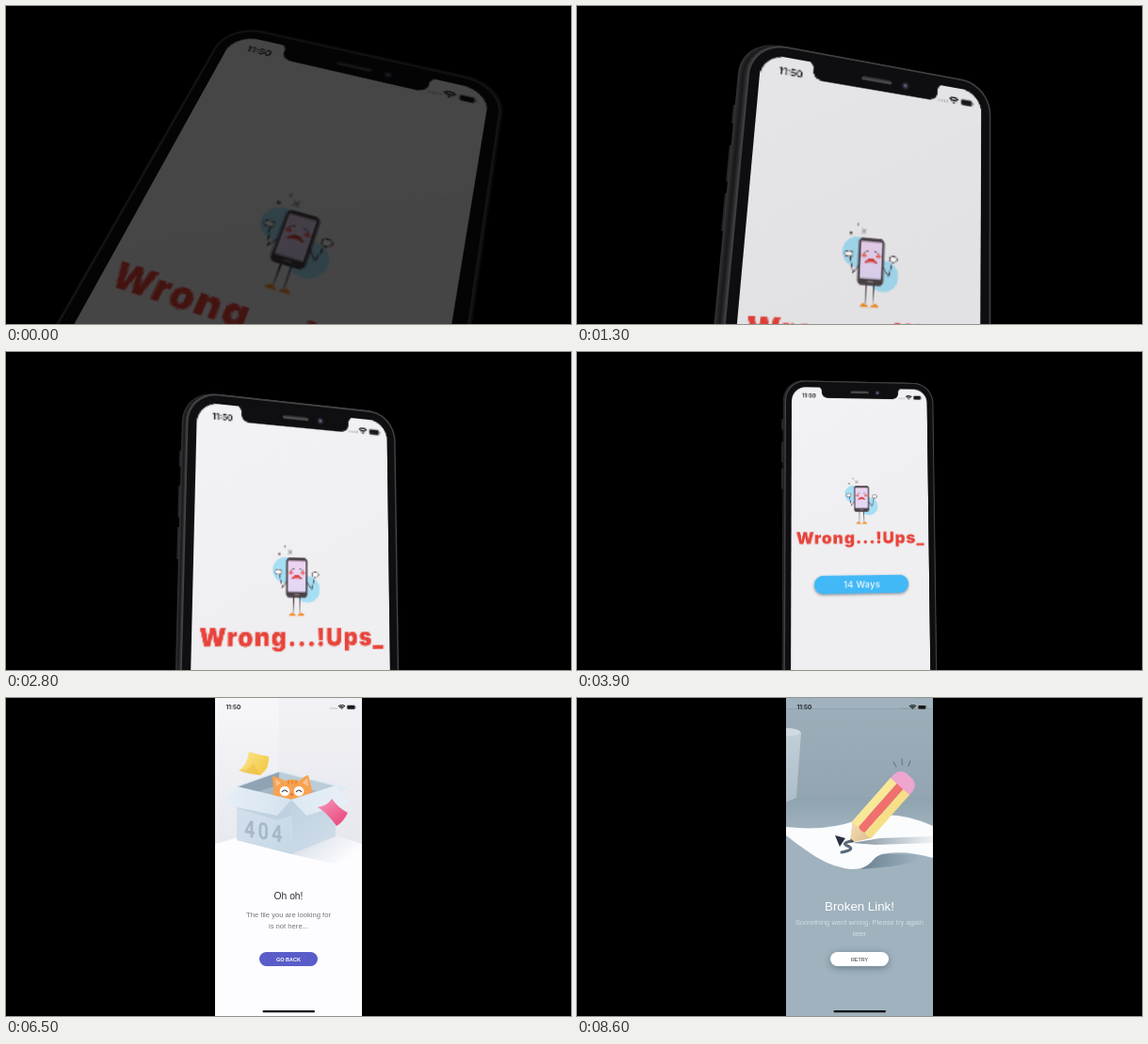
An HTML page with a canvas that plays this animation: 600x338 px, repeating every 8.9 s.

```html
<!DOCTYPE html>
<html lang="en">
<head>
<meta charset="utf-8">
<title>Error pages</title>
<style>
  html, body { margin: 0; width: 100%; height: 100%; overflow: hidden; background: #000; }
  #stage { position: relative; width: 600px; height: 338px; overflow: hidden; }
  canvas { position: absolute; left: 0; top: 0; }
  #screen { width: 156px; height: 338px; transform-origin: 0 0; }
</style>
</head>
<body>
<div id="stage">
  <canvas id="body" width="600" height="338"></canvas>
  <canvas id="screen"></canvas>
</div>
<script>
const LOOP = 8900, W = 156, H = 338, REF = 171;
const SANS = '"Liberation Sans", Arial, sans-serif';
const INTER = 'Inter, Roboto, sans-serif';
const stage = document.getElementById('stage');
const shell = document.getElementById('body');
const screen = document.getElementById('screen');
const bctx = shell.getContext('2d');
const ctx = screen.getContext('2d');

const clamp = v => Math.max(0, Math.min(1, v));
const span = (t, a, b) => clamp((t - a) / (b - a));
const smooth = v => v * v * (3 - 2 * v);
const mix = (a, b, k) => a.map((v, i) => v + (b[i] - v) * k);

// Pose: screen points at (0,0), (W,0), (W,REF), (0,REF), then the offset of the phone's back.
const low   = [243, 30, 514, 91, 464, 397, 104, 281, 2, -1];
const near  = [196, 50, 429.5, 92, 428.5, 353, 169.5, 342, -10, -1];
const mid   = [203, 53, 404.5, 74, 407.5, 303, 197, 304, -5, 0];
const far   = [228, 37, 371.5, 40, 373.5, 197, 227.5, 198, -2, 0];
const front = [236, 31, 364, 31, 364, 171, 236, 171, 0, 0];
const full  = [222, 0, 378, 0, 378, REF, 222, REF, 0, 0];
const keys = [
  [0, low], [950, mix(low, near, 0.58)], [1300, near], [1900, mix(near, mid, 0.35)],
  [2800, mid], [3700, mix(mid, far, 0.78)], [3900, far], [4550, front], [4700, front], [5200, full]
];

// Monotone cubic interpolation, so that poses never overshoot.
function poseAt(t) {
  if (t >= 5200) return full;
  let n = 0;
  while (n < keys.length - 2 && t >= keys[n + 1][0]) n++;
  const [t0, p0] = keys[n], [t1, p1] = keys[n + 1];
  const d = t1 - t0, u = (t - t0) / d;
  const secant = (k, i) => (keys[k + 1][1][i] - keys[k][1][i]) / (keys[k + 1][0] - keys[k][0]);
  const slope = (k, i) => {
    if (k === 0 || k === keys.length - 1) return 0;
    const a = secant(k - 1, i), b = secant(k, i);
    return a * b <= 0 ? 0 : 2 * a * b / (a + b);
  };
  return p0.map((v, i) => {
    const s = smooth(u), w = 1 - u;
    return v + (p1[i] - v) * s + d * (slope(n, i) * u * w * w - slope(n + 1, i) * u * u * w);
  });
}

function homography([x0, y0, x1, y1, x2, y2, x3, y3]) {
  const sx = x0 - x1 + x2 - x3, sy = y0 - y1 + y2 - y3;
  const ax = x1 - x2, ay = y1 - y2, bx = x3 - x2, by = y3 - y2;
  const den = ax * by - bx * ay;
  const g = (sx * by - bx * sy) / den, h = (ax * sy - sx * ay) / den;
  return {
    a: (x1 - x0 + g * x1) / W, b: (x3 - x0 + h * x3) / REF, c: x0,
    d: (y1 - y0 + g * y1) / W, e: (y3 - y0 + h * y3) / REF, f: y0,
    g: g / W, h: h / REF
  };
}
function project(m, x, y) {
  const w = m.g * x + m.h * y + 1;
  return [(m.a * x + m.b * y + m.c) / w, (m.d * x + m.e * y + m.f) / w];
}

// Phone body
function outline(m, grow, r, ox, oy) {
  const corners = [[W + grow - r, r - grow], [W + grow - r, H + grow - r], [r - grow, H + grow - r], [r - grow, r - grow]];
  bctx.beginPath();
  corners.forEach(([cx, cy], q) => {
    for (let i = 0; i <= 10; i++) {
      const a = (q - 1 + i / 10) * Math.PI / 2;
      const [x, y] = project(m, cx + r * Math.cos(a), cy + r * Math.sin(a));
      bctx.lineTo(x + ox, y + oy);
    }
  });
  bctx.closePath();
}
function drawBody(m, ox, oy, alpha) {
  bctx.clearRect(0, 0, 600, 338);
  if (!alpha) return;
  bctx.globalAlpha = alpha;
  bctx.lineWidth = 2.5;
  bctx.strokeStyle = '#29292b';
  for (const [y0, y1] of [[37, 49], [63, 86], [93, 116]]) {
    const p = project(m, -7.8, y0), q = project(m, -7.8, y1);
    bctx.beginPath();
    bctx.moveTo(p[0] + ox, p[1] + oy);
    bctx.lineTo(q[0] + ox, q[1] + oy);
    bctx.stroke();
  }
  for (let i = 6; i >= 0; i--) {
    outline(m, 7.5, 23, ox * i / 6, oy * i / 6);
    bctx.fillStyle = ['#434345', '#333335', '#242426', '#1c1c1e', '#202022', '#2a2a2c', '#343436'][i];
    bctx.fill();
  }
  outline(m, 6.3, 22, 0, 0);
  bctx.fillStyle = '#0f0f11';
  bctx.fill();
  bctx.globalAlpha = 1;
}

// Drawing helpers for the flat screen
function poly(fill, ...pts) {
  ctx.beginPath();
  pts.forEach(p => ctx.lineTo(p[0], p[1]));
  ctx.closePath();
  ctx.fillStyle = fill;
  ctx.fill();
}
function line(color, width, ...pts) {
  ctx.beginPath();
  pts.forEach(p => ctx.lineTo(p[0], p[1]));
  ctx.strokeStyle = color;
  ctx.lineWidth = width;
  ctx.stroke();
}
function oval(fill, x, y, rx, ry = rx) {
  ctx.beginPath();
  ctx.ellipse(x, y, rx, ry, 0, 0, 7);
  ctx.fillStyle = fill;
  ctx.fill();
}
function pill(fill, x, y, w, h, r) {
  ctx.beginPath();
  ctx.roundRect(x, y, w, h, r);
  ctx.fillStyle = fill;
  ctx.fill();
}
function curve(d, fill, stroke, width) {
  const p = new Path2D(d);
  if (fill) { ctx.fillStyle = fill; ctx.fill(p); }
  if (stroke) { ctx.strokeStyle = stroke; ctx.lineWidth = width; ctx.stroke(p); }
}
function fade(x0, y0, x1, y1, ...stops) {
  const g = ctx.createLinearGradient(x0, y0, x1, y1);
  stops.forEach((c, i) => g.addColorStop(i / (stops.length - 1), c));
  return g;
}
function label(text, x, y, font, fill, align = 'center', spacing = '0px') {
  ctx.font = font;
  ctx.textAlign = align;
  ctx.letterSpacing = spacing;
  ctx.fillStyle = fill;
  ctx.fillText(text, x, y);
  ctx.letterSpacing = '0px';
}
function shadowed(color, blur, dy, draw) {
  const scale = screen.width / W;
  ctx.save();
  ctx.shadowColor = color;
  ctx.shadowBlur = blur * scale;
  ctx.shadowOffsetY = dy * scale;
  draw();
  ctx.restore();
}

function drawMascot() {
  ctx.save();
  ctx.translate(79, 127);
  ctx.lineCap = ctx.lineJoin = 'round';
  oval('#a6def5', -9.5, -5.5, 9.5);
  oval('#a6def5', 8.5, 8.5, 10);
  const ink = '#4a4146';
  line(ink, 0.6, [-8, 3], [-11.5, 7.5], [-14, -3]);
  line(ink, 0.6, [8, 3], [12, 8.5], [14.5, -1.5]);
  for (const [x, y] of [[-14.6, -4], [14.8, -2.6]]) {
    oval(ink, x, y, 2.9, 2.2);
    oval('#fff', x, y, 2.3, 1.6);
  }
  for (const s of [-1, 1]) {
    line(ink, 0.6, [s * 2.5, 13], [s * 2.9, 26]);
    curve(`M${s * 3.2 - 3} 28.3 Q${s * 4.2} 24 ${s * 3.2 + 3} 28.3 Z`, '#f58a1f');
  }
  pill(ink, -8.5, -14.7, 17, 29.4, 2.4);
  pill(fade(-7, -12, 7, 9, '#efd3f0', '#e2d9f8'), -7.2, -12.6, 14.4, 23.2, 0.8);
  pill('#857b82', -2, 12, 4, 1.1, 0.5);
  for (const s of [-1, 1]) {
    line(ink, 0.5, [s * 2.4, -6.5], [s * 4.9, -5.6]);
    oval('#f0645f', s * 4.8, -3.6, 1.7, 1.1);
  }
  curve('M-4.2 0.8 Q0 -4.5 4.2 0.8 Q0 -0.6 -4.2 0.8 Z', '#e7413a', '#c5383a', 0.4);
  line(ink, 0.5, [-7, -20.5], [-4, -17.5]);
  line(ink, 0.5, [-4, -20.5], [-7, -17.5]);
  line(ink, 0.4, [-15, -18], [-13, -16.4]);
  line(ink, 0.4, [-13, -18], [-15, -16.4]);
  oval('#6b7780', -9.7, -23, 0.7);
  ctx.restore();
}

function homePage() {
  ctx.fillStyle = fade(0, 0, 90, 160, '#f3f2f5', '#efeef1');
  ctx.fillRect(0, 0, W, H);
  drawMascot();
  label('Wrong...!Ups_', 5.3, 177.3, `900 18.5px ${INTER}`, '#e8433a', 'left', '0.85px');
  shadowed('rgba(70,80,90,.55)', 3, 1.5, () => pill('#42b8f6', 25.5, 213, 106.5, 20, 10));
  label('14 Ways', 79, 226.6, `500 10px ${INTER}`, '#f4fbff', 'center', '0.3px');
}

function catPage() {
  ctx.fillStyle = '#fdfcff';
  ctx.fillRect(0, 0, W, H);
  poly(fade(0, 0, 0, 160, '#f7f6f9', '#e7e9ee'), [0, 0], [68, 0], [68, 136], [0, 155]);
  poly(fade(0, 0, 0, 175, '#f2f1f5', '#e4e7ed'), [68, 0], [W, 0], [W, 157], [68, 130]);
  poly(fade(100, 145, 130, 180, '#d9e0e9', '#fdfcff'), [23, 151], [128, 146], [W, 155], [W, 183], [82, 166]);

  // carton
  poly('#a6b7c6', [23, 94], [68, 78], [128, 93], [81, 108]);
  poly('#8fa3b5', [23, 94], [68, 78], [68, 92], [36, 103]);
  poly('#bccbd8', [68, 78], [128, 93], [114, 100], [68, 90]);
  line('#dce7f0', 1.5, [23, 94], [68, 78], [128, 93]);
  poly('#e0eaf2', [128, 93], [142, 95], [132, 101], [119, 96]);

  // cat
  curve('M62 110 L62 98 L61 83 Q68 84 74 88 Q82 85 90 88 Q94 83 99 82 L103 98 L101 110 Z', '#f7a24f');
  poly('#f8c293', [64, 86], [70, 90], [65, 94]);
  poly('#f8c293', [98, 85], [93, 90], [99, 94]);
  for (const x of [78, 82, 86]) line('#dc7d30', 1.3, [x, 87.5], [x, 91.5]);
  for (const x of [74, 89]) {
    oval('#fff', x, 99, 5.3);
    curve(`M${x - 3} 100 Q${x} 96 ${x + 3} 100`, null, '#493b40', 1.2);
  }
  oval('#d85c45', 81.5, 102.5, 1.4, 1);

  poly(fade(23, 100, 82, 160, '#d4e2ed', '#c7d8e6'), [23, 94], [81, 108], [81.5, 166], [23, 151]);
  poly(fade(82, 110, 128, 160, '#bfd1e0', '#d1deea'), [81, 108], [128, 93], [128, 147], [81.5, 166]);
  poly('rgba(132,155,176,.18)', [23, 111], [66, 123], [81, 109], [81, 125], [66, 130], [23, 117]);
  poly(fade(10, 110, 75, 105, '#e6eff7', '#d6e3ef'), [23, 94], [8, 113], [66, 125], [81, 108]);
  poly(fade(82, 115, 140, 100, '#dce8f2', '#e8f0f7'), [81, 108], [128, 93], [142, 111], [97, 125]);
  ctx.save();
  ctx.transform(0.8, 0.13, 0, 1, 31, 147);
  label('404', 0, 0, `700 25px Roboto, ${SANS}`, '#a8b8c6', 'left', '3.8px');
  ctx.restore();

  // notes
  curve('M25 77 Q34 72 36 57 Q47 61 57 62 Q58 75 48 82 Q37 81 25 77 Z', fade(28, 60, 52, 82, '#fae58a', '#f3c742'));
  curve('M25 77 Q39 76 40 69 L48 82 Q36 82 25 77 Z', 'rgba(222,169,40,.25)');
  curve('M109 116 Q119 115 124 107 Q131 117 141 122 Q136 132 129 136 Q119 122 109 116 Z', fade(114, 110, 132, 136, '#f68db0', '#e84b80'));

  label('Oh oh!', 78, 214, `10.3px ${SANS}`, '#2f2e35');
  label('The file you are looking for', 78, 232.7, `7.65px ${SANS}`, '#77767d');
  label('is not here...', 78, 245.2, `7.65px ${SANS}`, '#77767d');
  pill('#5a5dc9', 47, 270, 62, 15, 7.5);
  label('GO BACK', 78, 279.6, `700 5.5px ${SANS}`, '#fff');
}

function drawPencil() {
  ctx.save();
  ctx.translate(68, 154);
  ctx.rotate(Math.atan2(61, 69));
  poly(fade(-13, 0, 13, 0, '#f2dcb4', '#dfc08f'), [0, 0], [-13.5, -19], [13.5, -19]);
  poly('#46515d', [0, 0], [-2.5, -3.8], [2.5, -3.8]);
  pill('#eda6cf', -13.5, -95, 27, 24, [10, 10, 0, 0]);
  [['#f8e897', -13.5], ['#f0706e', -4.5], ['#f5df87', 4.5]].forEach(([c, x]) => {
    pill(c, x, -80, 9, 60, 0);
    oval(c, x + 4.5, -20, 4.5, 2.4);
  });
  ctx.restore();
}

function linkPage() {
  ctx.fillStyle = '#9fb2be';
  ctx.fillRect(0, 0, W, H);
  ctx.fillStyle = fade(0, 11, 0, 107, '#9caeb9', '#92a5b1');
  ctx.fillRect(0, 11, W, 96);
  ctx.fillStyle = fade(0, 106, 0, 140, '#8fa3af', '#9fb2be');
  ctx.fillRect(0, 106, W, 34);
  line('#8b9eaa', 0.7, [0, 11.5], [W, 11.5]);
  poly(fade(0, 30, 16, 110, '#c3d0d8', '#adbdc8'), [0, 32], [16, 37], [11, 106], [0, 111]);
  curve('M0 32 Q14 32 16 37 Q10 41 0 40 Z', '#d0dae1');

  // sheet
  poly(fade(90, 170, 140, 178, '#71899a', '#9fb2be'), [80, 182], [98, 165], [W, 168], [W, 171], [112, 179]);
  curve('M0 137 Q42 142 75 130 Q112 116 156 136 L156 170 Q124 161 102 166 Q95 168 91 174 Q80 185 62 181 Q42 177 23 163 Q11 155 0 146 Z', '#fbfcfe');
  poly(fade(76, 152, W, 150, '#8796a3', '#f0f3f6'), [70, 154], [100, 149], [W, 147], [W, 154], [95, 156]);

  ctx.lineCap = 'round';
  curve('M70 152 Q58 154 65 157 Q75 161 59 164', null, '#5b6976', 3);
  poly('#28313d', [52, 146], [63, 149], [57, 158]);
  drawPencil();
  line('#6a7c89', 1.3, [114, 68], [117, 73]);
  line('#6a7c89', 1.3, [123, 65], [123.5, 71]);
  line('#6a7c89', 1.3, [132, 67], [130, 72]);
  ctx.lineCap = 'butt';

  label('Broken Link!', 78, 226, `13.3px ${SANS}`, '#fff');
  label('Something went wrong. Please try again', 78, 240.5, `7.6px ${SANS}`, '#d4dee5');
  label('later', 78, 253, `7.6px ${SANS}`, '#d4dee5');
  shadowed('rgba(60,80,95,.55)', 8, 2, () => pill('#fff', 47, 270, 62, 15, 7.5));
  label('RETRY', 78, 279.5, `5.4px ${SANS}`, '#2c343b');
}

function statusBar() {
  const ink = '#1a1a1c';
  label('11:50', 11.5, 12, `600 6.5px ${INTER}`, ink, 'left');
  for (let i = 0; i < 4; i++) oval('#85858a', 123 + i * 2.1, 11, 0.6);
  ctx.save();
  ctx.translate(134.5, 12.2);
  for (const r of [1.1, 2.9, 4.7]) {
    ctx.beginPath();
    ctx.arc(0, 0, r, -Math.PI * 0.76, -Math.PI * 0.24);
    ctx.strokeStyle = ink;
    ctx.lineWidth = 1.2;
    ctx.stroke();
  }
  ctx.restore();
  pill('#a5a5a9', 139.8, 7.3, 9.2, 5, 1.5);
  pill(ink, 140.4, 7.9, 8, 3.8, 1);
  pill('#85858a', 149.4, 9, 0.7, 1.7, 0.3);
  pill('#0b0b0d', 50.5, 332, 55.5, 2.3, 1.15);
}

function notch(alpha) {
  ctx.globalAlpha = alpha;
  curve('M29 -1 Q34 0 34 5 Q34 12 42 12 L114 12 Q122 12 122 5 Q122 0 127 -1 Z', '#0f0f11');
  pill('#4b4b4d', 67, 3.5, 21, 2.5, 1.2);
  oval('#2c2d36', 98, 5, 2.6);
  oval('#5a628c', 98, 5, 1.3);
  ctx.globalAlpha = 1;
}

function page(draw, x) {
  if (Math.abs(x) >= W) return;
  ctx.save();
  ctx.translate(x, 0);
  ctx.beginPath();
  ctx.rect(0, 0, W, H);
  ctx.clip();
  draw();
  ctx.restore();
}

function drawScreen(t, scale, hardware) {
  screen.width = Math.round(W * scale);
  screen.height = Math.round(H * scale);
  ctx.scale(screen.width / W, screen.height / H);
  ctx.beginPath();
  ctx.roundRect(0, 0, W, H, 16 * hardware);
  ctx.clip();
  const pos = smooth(span(t, 5600, 6200)) + smooth(span(t, 7700, 8300));
  [homePage, catPage, linkPage].forEach((draw, i) => page(draw, (i - pos) * W));
  statusBar();
  if (hardware) notch(hardware);
}

function render(now) {
  const t = now % LOOP;
  const pose = poseAt(t), m = homography(pose);
  const hardware = 1 - span(t, 4800, 5150);
  const wide = Math.max(pose[2] - pose[0], pose[4] - pose[6]) / W;
  drawBody(m, pose[8], pose[9], hardware);
  drawScreen(t, t >= 5200 ? 1 : wide * 2, hardware);
  screen.style.transform = t >= 5200 ? 'translate(222px, 0)' :
    `matrix3d(${[m.a, m.d, 0, m.g, m.b, m.e, 0, m.h, 0, 0, 1, 0, m.c, m.f, 0, 1].map(v => v.toFixed(8))})`;
  stage.style.opacity = 0.29 + 0.71 * span(t, 0, 1400);
}

const start = performance.now();
function tick() {
  render(performance.now() - start);
  requestAnimationFrame(tick);
}
tick();
</script>
</body>
</html>
```
